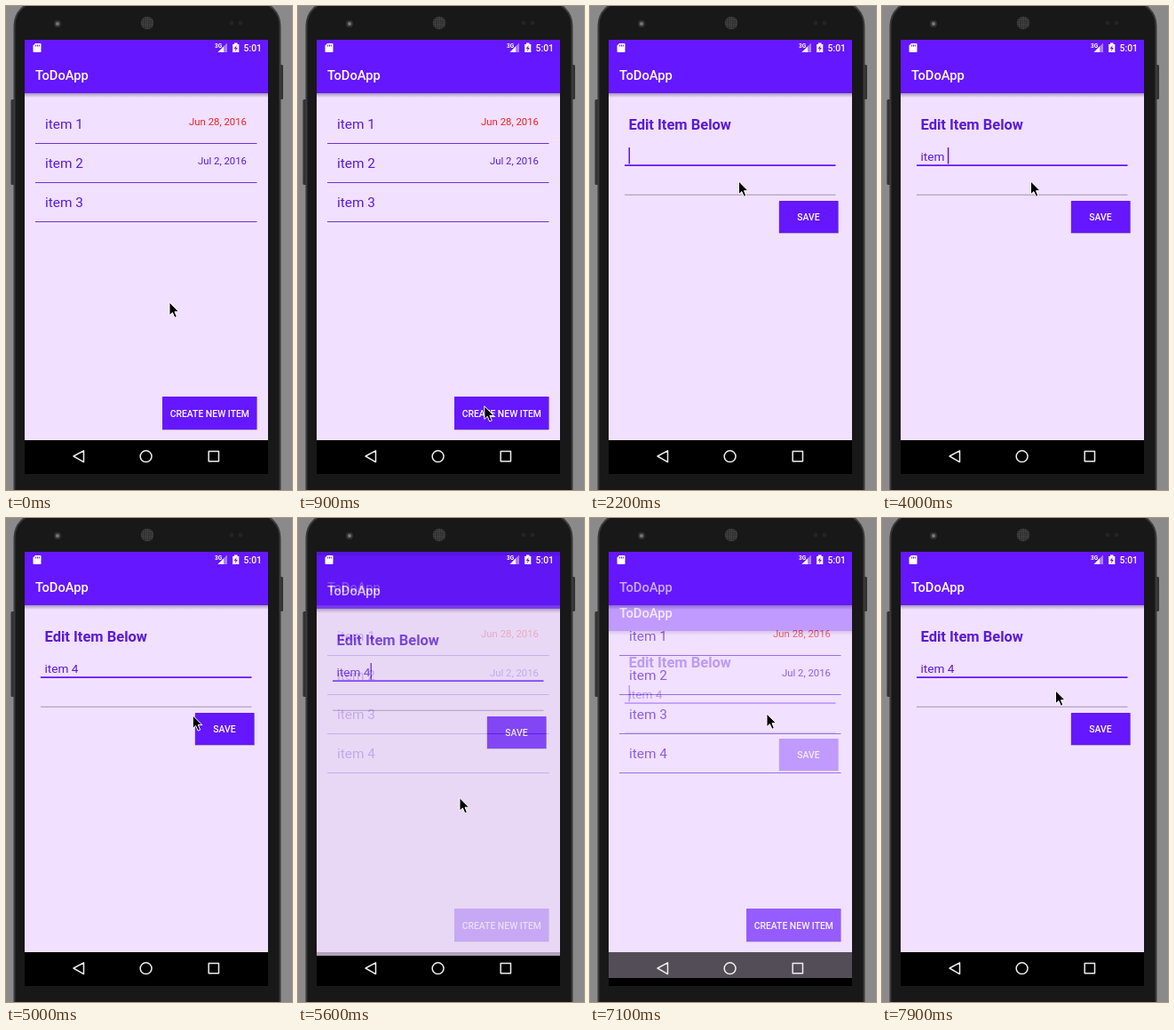
An HTML page for the animation above (8000 ms loop, 322 by 544 pixels).

```html
<!DOCTYPE html>
<html lang="en">
<head>
<meta charset="utf-8">
<title>To-do list</title>
<style>
  html, body { margin: 0; width: 100%; height: 100%; overflow: hidden; background: #8a8a8a; }
  svg { display: block; width: 322px; height: 544px; }
  text { font-family: Roboto, sans-serif; fill: #5a1ad8; white-space: pre; }
  .title { font-size: 14.7px; font-weight: 500; fill: #fff; }
  .item { font-size: 15.4px; }
  .date { font-size: 11.35px; text-anchor: end; }
  .head { font-size: 16.5px; font-weight: 700; }
  .field { font-size: 13.6px; }
  .label { font-size: 10.4px; font-weight: 500; fill: #fff; text-anchor: middle; }
  .clock { font-size: 10.4px; font-weight: 500; fill: #fff; }
</style>
</head>
<body>
<svg viewBox="0 0 322 544">
  <defs>
    <clipPath id="screen"><path d="M21 38H295V526H21Z"/></clipPath>
    <linearGradient id="shade" x2="0" y2="1">
      <stop stop-color="#302040" stop-opacity=".38"/>
      <stop offset="1" stop-color="#302040" stop-opacity="0"/>
    </linearGradient>
    <pattern id="mesh" width="2.4" height="2.4" patternUnits="userSpaceOnUse">
      <circle cx="1.2" cy="1.2" r=".8" fill="#555"/>
    </pattern>
    <g id="window">
      <path fill="#f1e0ff" d="M21 38H295V488H21Z"/>
      <path fill="url(#shade)" d="M21 98H295V103H21Z"/>
      <path fill="#6517ff" d="M21 38H295V98H21Z"/>
      <text class="title" x="33" y="83">ToDoApp</text>
    </g>
  </defs>

  <!-- phone body -->
  <path fill="#8a8a8a" d="M0 0H322V544H0Z"/>
  <rect x="5.5" y="105" width="5" height="96" rx="1.5" fill="#333"/>
  <rect x="307" y="66" width="5" height="39" rx="1.5" fill="#333"/>
  <rect x="9.5" y="-5" width="299" height="600" rx="27" fill="#181818" stroke="#3b3b3b" stroke-width="2"/>
  <circle cx="58" cy="20" r="4" fill="#333"/>
  <circle cx="58" cy="20" r="2" fill="#777"/>
  <circle cx="159" cy="19" r="7.5" fill="#292929"/>
  <circle cx="159" cy="19" r="7" fill="url(#mesh)"/>
  <g fill="#242424"><circle cx="254" cy="19" r="2.5"/><circle cx="264" cy="19" r="2.5"/></g>
  <path d="M21 38H295V526H21Z"/>

  <g clip-path="url(#screen)">
    <g id="list">
      <use href="#window"/>
      <g id="rows"></g>
      <text class="date" x="271" y="134" style="fill:#f02020">Jun 28, 2016</text>
      <text class="date" x="271" y="178">Jul 2, 2016</text>
      <path fill="#302040" opacity=".25" d="M176 440H282.5V477H176Z"/>
      <path fill="#6517ff" d="M176 439H282.5V476H176Z"/>
      <text class="label" x="229.3" y="461.7">CREATE NEW ITEM</text>
    </g>
    <g id="edit">
      <use href="#window"/>
      <text class="head" x="43.5" y="139">Edit Item Below</text>
      <text class="field" id="typed" x="43.5" y="173.5"></text>
      <path id="caret" fill="#5a1ad8" d="M43.5 159H45V177.5H43.5Z"/>
      <path fill="#6517ff" d="M39 178.2H276.5V180H39Z"/>
      <path fill="#a093ab" d="M39 211.7H276.5V212.7H39Z"/>
      <path fill="#302040" opacity=".25" d="M212.5 220H280V256H212.5Z"/>
      <path fill="#6517ff" d="M213 219H279.5V255H213Z"/>
      <text class="label" x="246" y="241">SAVE</text>
    </g>
  </g>

  <!-- status and navigation bars -->
  <g fill="#fff">
    <path d="M33 42H38.5Q39.5 42 39.5 43V51Q39.5 52 38.5 52H31.5Q30.5 52 30.5 51V44.5Z"/>
    <path fill="#6517ff" d="M33.2 43.5h1v2h-1zM35 43.5h1v2h-1zM36.8 43.5h1v2h-1z"/>
    <text x="235" y="46.5" style="font-size:6.5px;font-weight:700;fill:#fff">3G</text>
    <path opacity=".45" d="M238.5 52L249 41.5V52Z"/>
    <path d="M238.5 52L245 45.5V52Z"/>
    <path d="M257 41.5H260.5V43H262.3V52H255.2V43H257Z"/>
    <path fill="#6517ff" d="M259.6 44L256.8 48H258.5L258 51L260.8 47H259.1Z"/>
    <text class="clock" x="267.5" y="51">5:01</text>
  </g>
  <g fill="none" stroke="#eee" stroke-width="1.5" stroke-linejoin="round">
    <path d="M76 506L87.5 499.8V512.6Z"/>
    <circle cx="157.6" cy="506.2" r="6.4"/>
    <path d="M228.2 500.5H239.5V511.8H228.2Z"/>
  </g>
  <path id="mouse" stroke="#fff" d="M0 0V14.7L3.4 11.6L5.9 17.3L8.4 16.2L6 10.7H10.6Z"/>
</svg>

<script>
const $ = id => document.getElementById(id);
const LOOP = 8000, STEP = 100, DROP = 39;
const OPEN = 1070, CLOSE = 5459, REOPEN = 7080;
const clamp = v => Math.min(1, Math.max(0, v));

for (let i = 0; i < 4; i++) {
  const y = 138 + 44 * i;
  $('rows').innerHTML += `<g><text class="item" x="44" y="${y}">item ${i + 1}</text>
    <path fill="#6a35cf" d="M33 ${y + 16}H282.5v1H33Z"/></g>`;
}
const lastRow = $('rows').lastElementChild;

// pointer stops: time, x, y
const path = [
  [0, 184, 333], [200, 184, 333], [600, 212, 452], [850, 212, 455], [1200, 173.5, 359],
  [1500, 170, 280], [1900, 167.5, 197], [4800, 167.5, 197], [5150, 238, 238], [5350, 238, 238],
  [5600, 182, 314.5], [6200, 182, 314.5], [6600, 196, 264], [6900, 197, 262],
  [7100, 199, 220], [7300, 195.5, 194], [8000, 195.5, 194]
];
// moments at which each typed character appears
const keys = [3000, 3200, 3400, 3600, 3800, 4400];

function pointer(t) {
  const i = path.findIndex(p => p[0] > t);
  const [t0, x0, y0] = path[i - 1], [t1, x1, y1] = path[i];
  const u = (t - t0) / (t1 - t0), e = u * u * (3 - 2 * u);
  return [x0 + (x1 - x0) * e, y0 + (y1 - y0) * e];
}

const enter = ms => ({
  y: DROP * (1 - clamp(ms / 350)) ** 5,
  alpha: 1 - (1 - clamp(ms / 200)) ** 4
});
const leave = ms => ({
  y: DROP * clamp(ms / 250) ** 4,
  alpha: 1 - clamp((ms - 100) / 150)
});

function editPose(t) {
  if (t < OPEN) return { y: 0, alpha: 0 };
  if (t >= REOPEN) return enter(t - REOPEN);
  if (t >= CLOSE) return leave(t - CLOSE);
  if (t >= 1900) return { y: 0, alpha: 1 };
  // the entrance stalls just short of its resting place
  return t < 1200 ? enter(t - OPEN) : { y: 2, alpha: 1 };
}

function draw(t) {
  const { y, alpha } = editPose(t);
  $('edit').setAttribute('transform', `translate(0 ${Math.round(y)})`);
  $('edit').setAttribute('opacity', alpha);
  const back = t >= CLOSE && t < REOPEN ? clamp((t - CLOSE) / 250) : 1;
  $('list').setAttribute('opacity', 0.7 + 0.3 * back);
  lastRow.setAttribute('visibility', t >= CLOSE ? 'visible' : 'hidden');

  const count = keys.filter(k => k <= t).length;
  $('typed').textContent = 'item 4'.slice(0, count);
  const again = t >= REOPEN;
  const since = again ? 7300 : count ? keys[count - 1] : 1150;
  const on = t < since || Math.floor((t - since) / 500) % 2 === 0;
  const widths = [0, 3.3, 7.8, 15, 26.9, 30.3, 38];
  $('caret').setAttribute('visibility', on ? 'visible' : 'hidden');
  $('caret').setAttribute('transform', `translate(${again ? 0 : widths[count]} 0)`);

  $('mouse').setAttribute('transform', `translate(${pointer(t)})`);
}

function tick() {
  draw(Math.floor(performance.now() % LOOP / STEP) * STEP);
  requestAnimationFrame(tick);
}
tick();
</script>
</body>
</html>
```
